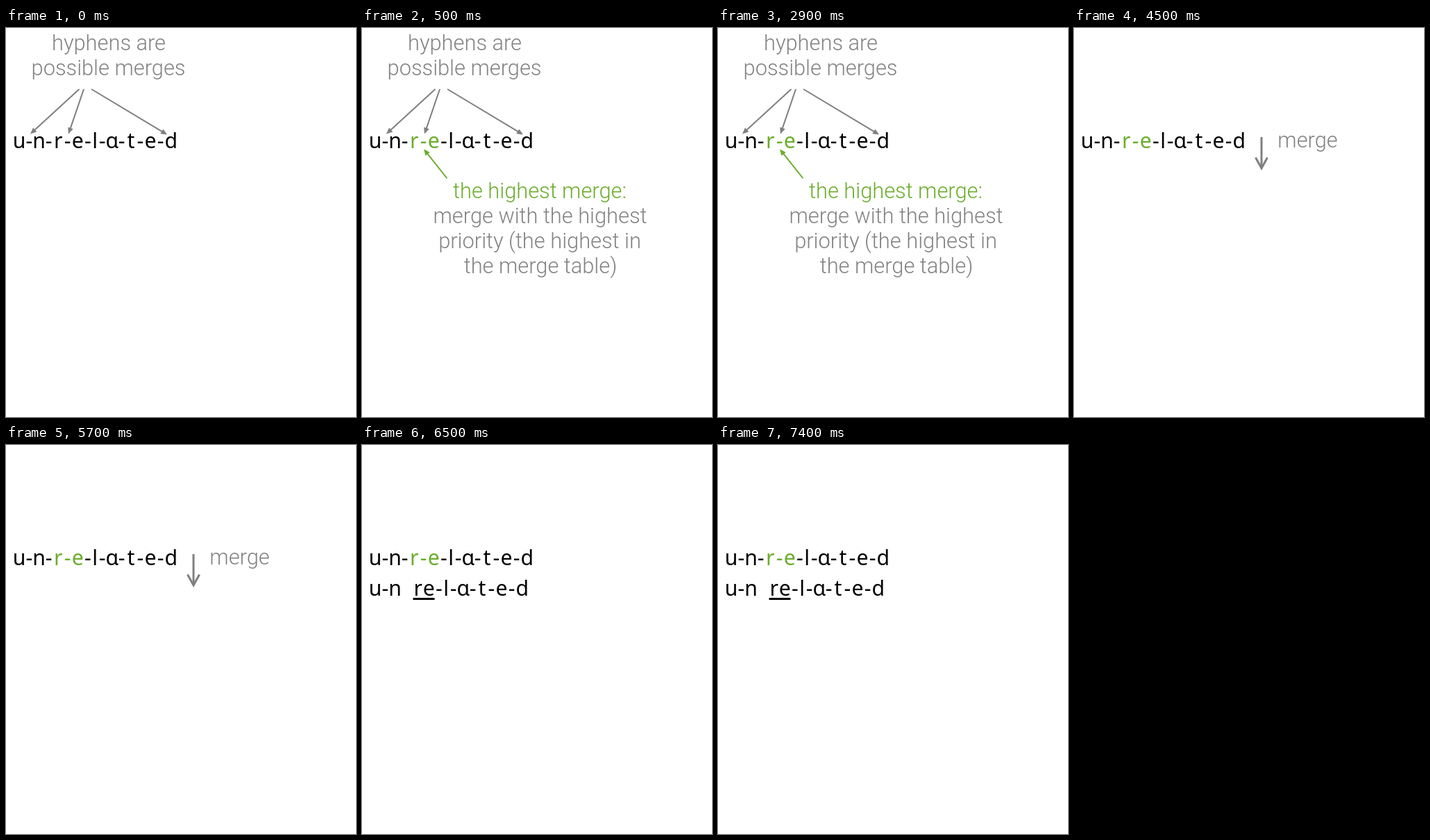
These frames come from a looping animation (504 px wide and 560 px high, 8000 ms). An HTML page with a canvas:

```html
<!DOCTYPE html>
<html lang="en">
<head>
<meta charset="utf-8">
<title>Merging subword units</title>
<style>
  html, body { margin: 0; width: 100%; height: 100%; overflow: hidden; background: #fff; }
  canvas { display: block; }
</style>
</head>
<body>
<canvas id="stage" width="504" height="560"></canvas>
<script>
const ctx = document.getElementById('stage').getContext('2d');
const LOOP = 8000;
const BLACK = '#000', GRAY = '#7f7f7f', TEXT_GRAY = '#828282', GREEN = '#6aad2a';

const WORD_SIZE = 30.2;
// Cell widths in em give the lettering its wide, even rhythm.
const CELL = { u: .52, n: .523, r: .48, e: .548, l: .274, a: .512, t: .471, d: .587, '-': .416, ' ': .3 };

function word(text, baseline, greenFrom = 0, greenTo = 0) {
  ctx.font = `400 ${WORD_SIZE}px "Noto Sans", sans-serif`;
  ctx.textAlign = 'center';
  let x = 11.3;
  [...text].forEach((char, i) => {
    const width = CELL[char] * WORD_SIZE;
    const glyph = char === 'a' ? '\u0251' : char; // single-storey a
    ctx.fillStyle = i >= greenFrom && i < greenTo ? GREEN : BLACK;
    ctx.fillText(glyph, x + width / 2, baseline);
    x += width;
  });
}

function caption(text, center, baseline, color = TEXT_GRAY) {
  ctx.font = '300 30.8px Roboto, "Open Sans", sans-serif';
  ctx.textAlign = 'center';
  ctx.fillStyle = color;
  ctx.fillText(text, center, baseline);
}

function line(points, color, width) {
  ctx.strokeStyle = color;
  ctx.lineWidth = width;
  ctx.beginPath();
  points.forEach(([x, y]) => ctx.lineTo(x, y));
  ctx.stroke();
}

function pointer(x1, y1, x2, y2, color) {
  const length = Math.hypot(x2 - x1, y2 - y1);
  ctx.save();
  ctx.translate(x2, y2);
  ctx.rotate(Math.atan2(y2 - y1, x2 - x1));
  line([[-length, 0], [-6, 0]], color, 2);
  ctx.fillStyle = color;
  ctx.beginPath();
  ctx.moveTo(0, 0);
  ctx.lineTo(-9, -4);
  ctx.lineTo(-9, 4);
  ctx.fill();
  ctx.restore();
}

function possibleMerges() {
  caption('hyphens are', 148, 32);
  caption('possible merges', 147.5, 68);
  pointer(105.5, 88, 35, 152.5, GRAY);
  pointer(112, 88, 90, 152.5, GRAY);
  pointer(123, 88, 232, 153.5, GRAY);
}

function highestMerge() {
  pointer(122.5, 216.5, 89, 174.5, GREEN);
  caption('the highest merge:', 256, 245, GREEN);
  caption('merge with the highest', 256.5, 281);
  caption('priority (the highest in', 256, 317);
  caption('the merge table)', 257, 353);
}

function mergeStep() {
  line([[270, 157], [270, 202]], GRAY, 3);
  line([[261.5, 186.5], [270, 202], [278.5, 186.5]], GRAY, 3);
  caption('merge', 336.5, 172);
}

function mergedWord() {
  word('u-n  re-l-a-t-e-d', 216.5);
  line([[73.5, 221.5], [104.5, 221.5]], BLACK, 3);
}

function draw(time) {
  ctx.fillStyle = '#fff';
  ctx.fillRect(0, 0, 504, 560);
  const chosen = time >= 500;
  word('u-n-r-e-l-a-t-e-d', 172.5, 4, chosen ? 7 : 4);
  if (time < 4500) possibleMerges();
  if (chosen && time < 4500) highestMerge();
  if (time >= 4500 && time < 6500) mergeStep();
  if (time >= 6500) mergedWord();
}

function tick() {
  draw(performance.now() % LOOP);
  requestAnimationFrame(tick);
}
tick();
</script>
</body>
</html>
```
